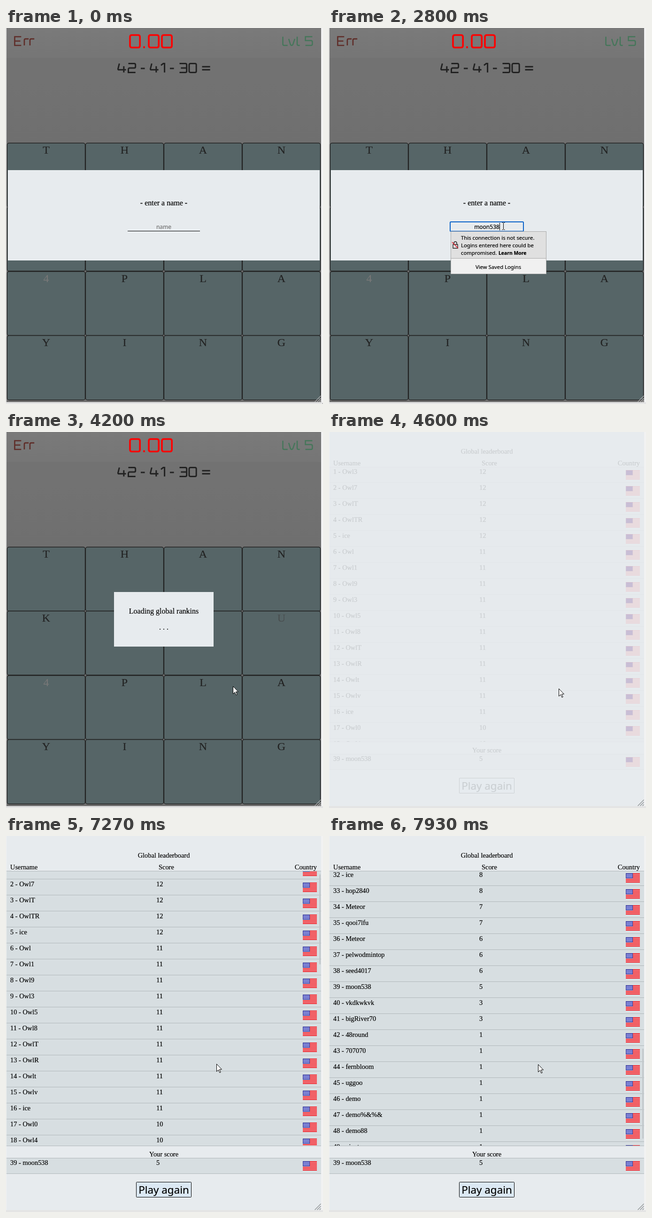
An HTML page with a canvas that plays this animation: 675x799 px, repeating every 8000 ms.

```html
<!DOCTYPE html>
<html lang="en">
<head>
<meta charset="utf-8">
<title>Number game leaderboard</title>
<style>
html, body { margin: 0; width: 100%; height: 100%; overflow: hidden; }
canvas { display: block; }
</style>
</head>
<body>
<canvas width="675" height="799"></canvas>
<script>
const ctx = document.querySelector('canvas').getContext('2d');
const LOOP = 8000, PANEL = '#e7ebee', DARK = '#222';
const SERIF = '"Liberation Serif", serif', SANS = '"Noto Sans", sans-serif';

const FOCUS = 725, SUBMIT = 3125, EMPTY = 3320, LOADING = 3380;
const LOADED = 4260, CLEARED = 4460, BOARD = 4560, FADE = 190;
const PLAYER = 'moon538';
const KEY_TIMES = [1395, 1595, 1725, 1795, 2395, 2595, 2795];

const NAMES = ('Owl3 Owl7 OwlT OwlTR ice Owl Owl1 Owl9 Owl3 Owl5 Owl8 OwlT OwlR Owlt Owlv ice Owl0 Owl4 ' +
  'Owl6 Owlw ice kite77 Owlz lumo plum44 Owlk ice bluepea mint9 wren52 Owl2 ice hop2840 Meteor qooi7lfu ' +
  'Meteor pelwodmintop seed4017 ' + PLAYER + ' vkdkwkvk bigRiver70 48round 707070 fernbloom uggoo demo ' +
  'demo%&%& demo88 pinetop').split(' ');
// Last rank of each score, from 12 downwards
const SCORE_ENDS = [5, 16, 22, 28, 33, 35, 38, 39, 39, 41, 41];
const scoreOf = rank => 12 - SCORE_ENDS.filter(end => rank > end).length;

// Pointer path: time, x, y
const POINTER = [
  [70, 674, 798], [660, 372, 422], [3520, 371, 420], [3930, 483, 540], [4230, 483, 540],
  [4350, 489, 545], [4870, 489, 545], [4990, 483, 564], [5150, 483, 564], [5230, 497, 559],
  [5600, 185, 800], [6440, 343, 800], [6441, 343, 690], [6600, 458, 560], [6950, 458, 560],
  [7120, 448, 484], [7270, 448, 484], [7400, 445, 485]
];

// Stroke lettering for the header, 20 units tall
const GLYPHS = {
  0: 'M3 0H13Q16 0 16 3V17Q16 20 13 20H3Q0 20 0 17V3Q0 0 3 0Z',
  1: 'M0 4L5 0H8V20',
  2: 'M0 0H13Q16 0 16 3V7Q16 10 13 10H3Q0 10 0 13V20H16',
  3: 'M0 0H13Q16 0 16 3V17Q16 20 13 20H0M3 10H16',
  4: 'M3 0L0 12Q0 14 2 14H18M13 6V20',
  5: 'M16 0H0V9H13Q16 9 16 12V17Q16 20 13 20H0',
  E: 'M15 0H0V20H15M0 10H13',
  r: 'M0 20V8Q0 5 3 5H10',
  L: 'M0 0V17Q0 20 3 20H11',
  v: 'M0 5L4 18Q5 20 7 20Q9 20 10 17L14 5',
  l: 'M0 0V17Q0 20 3 20H6',
  '-': 'M0 11H9', '=': 'M0 7H18M0 14H18', '.': 'M0 18V21'
};

const clamp = v => Math.max(0, Math.min(1, v));
const smooth = v => { v = clamp(v); return v * v * (3 - 2 * v); };
const swing = v => .5 - Math.cos(Math.PI * clamp(v)) / 2;

function rect(x, y, w, h, color) {
  ctx.fillStyle = color;
  ctx.fillRect(x, y, w, h);
}

function rounded(x, y, w, h, r, fill, line, width = 1) {
  ctx.beginPath();
  ctx.roundRect(x, y, w, h, r);
  ctx.fillStyle = fill;
  ctx.fill();
  ctx.strokeStyle = line;
  ctx.lineWidth = width;
  ctx.stroke();
}

// A hairline stroke gives the slightly heavier weight of hinted text
function text(str, x, y, font, color = '#000', align = 'left') {
  ctx.font = font;
  ctx.fillStyle = ctx.strokeStyle = color;
  ctx.textAlign = align;
  ctx.lineWidth = .2;
  ctx.fillText(str, x, y);
  ctx.strokeText(str, x, y);
}

function path(d, x, y, scale, line, width, fill) {
  ctx.save();
  ctx.translate(x, y);
  ctx.scale(scale, scale);
  const shape = new Path2D(d);
  if (fill) { ctx.fillStyle = fill; ctx.fill(shape); }
  ctx.strokeStyle = line;
  ctx.lineWidth = width / scale;
  ctx.stroke(shape);
  ctx.restore();
}

function lettering(str, xs, y, height, color, width) {
  [...str].forEach((c, i) => path(GLYPHS[c], xs[i], y, height / 20, color, width));
}

function withAlpha(alpha, draw) {
  ctx.save();
  ctx.globalAlpha = alpha;
  draw();
  ctx.restore();
}

function drawGame() {
  const shade = ctx.createLinearGradient(0, 0, 0, 244);
  shade.addColorStop(0, '#7a7a7a');
  shade.addColorStop(.45, '#727272');
  shade.addColorStop(1, '#6f6f6f');
  rect(1, 0, 670, 795, shade);
  rect(1, 64, 670, 42, '#727272');
  lettering('Err', [18.5, 39, 51], 18.5, 18.5, '#5f2d28', 2.6);
  lettering('0.00', [264, 294, 304, 332], 15, 26.5, '#f00', 3.6);
  lettering('Lvl5', [589.5, 602, 620, 637.5], 18.5, 18.5, '#45765a', 2.5);
  lettering('42-41-30=', [238.5, 260.5, 287, 307.5, 330, 349, 369.5, 390, 417.5], 75.5, 19, DARK, 3);

  [...'THANKYOU4PLAYING'].forEach((letter, i) => {
    const x = 2 + i % 4 * 167, y = 244 + Math.round((i >> 2) * 136.4);
    const color = i === 8 ? '#777' : i > 4 && i < 8 ? '#4a4f50' : DARK;
    rounded(x + .5, y + .5, 166, i > 11 ? 137 : 136, 4, '#566567', DARK, 1.3);
    text(letter, x + 83.5, y + 23, '24px ' + SERIF, color, 'center');
  });
}

function drawNameForm(t) {
  rect(4, 302, 664, 192, PANEL);
  withAlpha(1 - swing((t - SUBMIT) / FADE), () => {
    text('- enter a name -', 336, 377, '16px ' + SERIF, '#000', 'center');
    rect(259, 431, 154, 1, '#000');
    const focused = t >= FOCUS && t < SUBMIT;
    if (focused) rounded(258, 412, 156, 20, 1.5, PANEL, '#0a62c9', 2);
    const typed = KEY_TIMES.filter(k => k <= t);
    const value = PLAYER.slice(0, typed.length);
    text(value || 'name', 336, 427, '12px ' + SANS, value ? '#000' : '#757575', 'center');
    if (!focused) return;
    const width = value ? ctx.measureText(value).width : 0;
    const idle = t - (typed.at(-1) ?? FOCUS);
    if (Math.floor(idle / 472) % 2 === 0) rect(Math.round(336 + width / 2), 414, 1, 16, '#000');
    drawWarning();
  });
}

function drawWarning() {
  const font = '11.3px ' + SANS;
  rect(259, 432, 204, 91, '#a9a9a9');
  rect(260, 433, 202, 56, '#e0e0e0');
  rect(260, 490, 202, 32, '#f0f0f0');
  text('This connection is not secure.', 281, 450, font);
  text('Logins entered here could be', 281, 466, font);
  text('compromised.', 281, 482, font);
  text('Learn More', 361, 482, 'bold 10.4px ' + SANS);
  text('View Saved Logins', 360.5, 512, font, '#000', 'center');
  path('M2 7H12V15H2ZM4 7V4Q4 1 7 1Q10 1 10 4V7', 262, 453, 1, '#222', 1.4);
  path('M0 2L13 15', 262, 453, 1, '#e02030', 1.6);
}

function drawLoading(t) {
  rect(230, 340, 212, 116, PANEL);
  const alpha = swing((t - LOADING) / FADE) * (1 - swing((t - LOADED) / FADE));
  withAlpha(alpha, () => {
    text('Loading global rankins', 336, 386, '16px ' + SERIF, '#000', 'center');
    text('. . .', 336, 420, '16px ' + SERIF, '#000', 'center');
  });
}

function drawFlag(x, y) {
  rect(x, y, 30, 20, '#f6eaea');
  for (let i = 0; i < 7; i++) rect(x, y + i * 3, 30, 2, '#ee1c25');
  rect(x, y, 15, 11, '#2a2a90');
  rect(x + 1, y + 1, 13, 9, '#6e74cc');
  for (let i = 0; i < 20; i++) rect(x + 1 + i % 5 * 3, y + 2 + (i / 5 | 0) * 2, 1, 1, '#b4b8ee');
}

function drawRow(rank, baseline) {
  const font = '14.4px ' + SERIF;
  rect(1, baseline - 15, 670, 33, '#d7dee1');
  rect(1, baseline + 18, 670, 1, '#b1b8bb');
  text(rank + ' - ' + NAMES[rank - 1], 9, baseline, font);
  text(scoreOf(rank), 320, baseline, font);
  drawFlag(632, baseline - 8);
}

function drawBoard(t) {
  const font = '14.4px ' + SERIF;
  const scroll = Math.round(1061 * smooth((t - 7217) / 743));
  rect(1, 0, 670, 795, PANEL);
  withAlpha(swing((t - BOARD) / FADE), () => {
    text('Global leaderboard', 336, 46, font, '#000', 'center');
    text('Username', 9, 71, font);
    text('Score', 325, 71, font);
    text('Country', 662, 71, font, '#000', 'right');

    ctx.save();
    ctx.beginPath();
    ctx.rect(1, 75, 670, 583);
    ctx.clip();
    NAMES.forEach((_, i) => {
      const baseline = 89 + 34 * i - scroll;
      if (baseline > 50 && baseline < 680) drawRow(i + 1, baseline);
    });
    if (t >= 6465) rect(667, 76 + scroll * .356, 3, 191, '#c3c8cb');
    ctx.restore();

    rect(1, 74, 670, 1, '#b1b8bb');
    rect(1, 658, 670, 1, '#b1b8bb');
    text('Your score', 336, 681, font, '#000', 'center');
    drawRow(39, 699);
    rect(1, 684, 670, 1, '#b1b8bb');
    rounded(277.5, 735.5, 117, 32, 1, '#dbe8f3', '#000');
    text('Play again', 336, 760, '22.4px ' + SANS, '#000', 'center');
  });
}

function drawPointer(t) {
  const next = POINTER.findIndex(p => p[0] > t);
  const b = POINTER[next < 0 ? POINTER.length - 1 : next];
  const a = next < 0 ? b : POINTER[Math.max(0, next - 1)];
  const k = a === b ? 0 : (t - a[0]) / (b[0] - a[0]);
  const x = Math.round(a[1] + (b[1] - a[1]) * k), y = Math.round(a[2] + (b[2] - a[2]) * k);
  const overInput = t < EMPTY && x > 258 && x < 414 && y > 410 && y < 432;
  if (overInput) path('M-3 -8H-1L0 -7L1 -8H3M0 -7V6M-3 7H-1L0 6L1 7H3', x + .5, y + .5, 1, '#000', 1);
  else path('M0 0V16L3.7 12.5L6.5 18.5L8.7 17.5L6 11.5H11Z', x + .5, y + .5, 1, '#000', 1, '#fff');
}

function draw(t) {
  rect(0, 0, 675, 799, '#f2f2f2');
  rect(0, 795, 675, 4, '#e4e4e4');
  if (t < BOARD) drawGame();
  if (t < EMPTY) drawNameForm(t);
  else if (t < LOADING || (t >= CLEARED && t < BOARD)) rect(320, 374, 32, 47, PANEL);
  else if (t < CLEARED) drawLoading(t);
  else drawBoard(t);
  path('M0 13L13 0M5 13L13 5M10 13L13 10', 657.5, 781.5, 1, t < BOARD ? '#b5b5b5' : '#8a8d8f', 1.2);
  drawPointer(t);
}

function tick() {
  draw(performance.now() % LOOP);
  requestAnimationFrame(tick);
}
tick();
</script>
</body>
</html>
```
